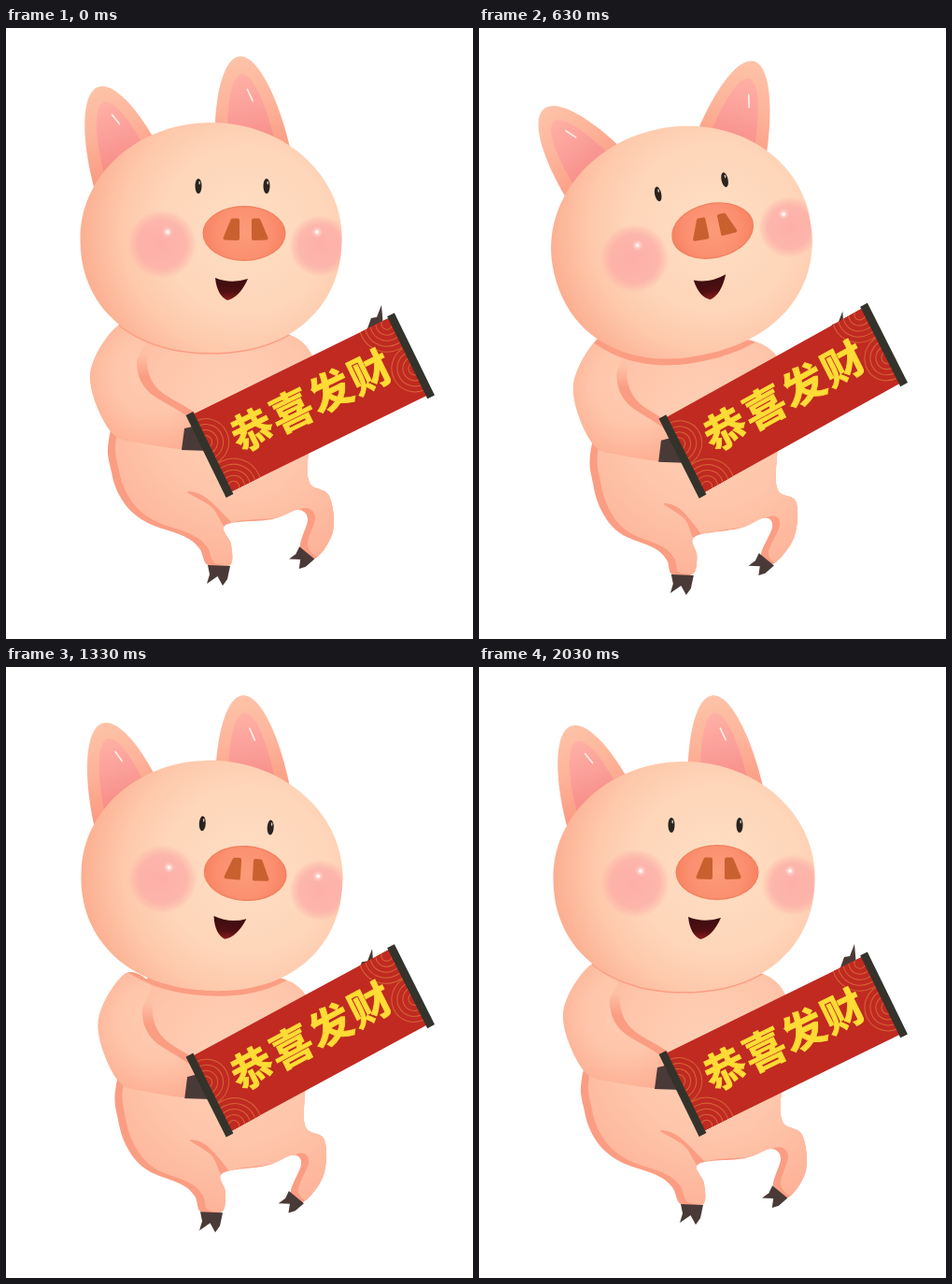
An HTML page with a canvas that plays this animation: 500 px wide and 653 px high, repeating every 2100 ms.

```html
<!DOCTYPE html>
<html lang="zh">
<head>
<meta charset="utf-8">
<title>恭喜发财</title>
<style>
html, body { margin: 0; width: 100%; height: 100%; overflow: hidden; background: #fff; }
canvas { display: block; width: 500px; height: 653px; }
</style>
</head>
<body>
<canvas id="stage" width="500" height="653"></canvas>
<script>
const ctx = document.getElementById('stage').getContext('2d');
const STEP = 70, COUNT = 30, LAST = COUNT - 1;
const LOW = 8, HIGH = 22, SUNK = 12; // turning points of head and body
const RAD = Math.PI / 180;
const SHADE = '#fb9d82', HOOF = '#4a3a37', RED = '#c02a21';

const TORSO = [
  [150, 320], [112, 430], [113, 475], [126, 507], [150, 528], [190, 543], [207, 556],
  [216, 574], [240, 574], [241, 552], [235, 531], [285, 525], [312, 515], [323, 525],
  [315, 555], [331, 567], [350, 538], [346, 500], [325, 486], [324, 450], [334, 372], [295, 325]
];
const ARM = [
  [120, 318], [90, 370], [111, 430], [146, 444], [206, 449],
  [200, 420], [152, 388], [140, 358], [150, 330]
];
const CREASE = [[194, 496], [220, 512], [234, 533], [246, 534], [214, 502]];
const HAND = [[191, 428], [212, 423], [218, 452], [188, 451]];
const LEAF = new Path2D('M-42 35C-40 -25 -22 -83 0 -83C22 -83 40 -25 42 35Z');
const CLEFT = new Path2D('M-12 0L12 1L9 15L4 22L-1.5 12L-13 20L-10 10Z');
const FAR_HAND = new Path2D('M387 321L391 310L397 309L402 296L404 320Z');
const NOSTRIL = new Path2D('M-14 -14L-8.5 -14L-8.5 5.5L-22 5Z');
const MOUTH = new Path2D('M224 267Q241 274 259 268Q250 288 237 291Q226 286 224 267Z');

// Rocks from rest to low, over to high and back to rest
function swing(n, low, high) {
  if (n < LOW) return low * n / LOW;
  if (n < HIGH) return low + (high - low) * (n - LOW) / (HIGH - LOW);
  return high * (LAST - n) / (LAST - HIGH);
}

const sink = n => n < SUNK ? n / SUNK : (LAST - n) / (LAST - SUNK);

// Sinking squeezes the body, tucks the legs in and brakes at the feet
const warp = (x, y, s) => [
  x + s * (0.09 * (250 - x) - 0.21 * Math.max(0, y - 500)),
  y + s * (17 - 0.07 * Math.max(0, x - 230)) - s * s * 0.25 * Math.max(0, y - 555)
];
const pose = (pts, s) => pts.map(([x, y]) => warp(x, y, s));

// Smooth closed curve through the points
function curve(pts) {
  const n = pts.length, at = i => pts[(i + n) % n], path = new Path2D();
  path.moveTo(...pts[0]);
  for (let i = 0; i < n; i++) {
    const [a, b, c, d] = [at(i - 1), at(i), at(i + 1), at(i + 2)];
    path.bezierCurveTo(b[0] + (c[0] - a[0]) / 6, b[1] + (c[1] - a[1]) / 6,
      c[0] - (d[0] - b[0]) / 6, c[1] - (d[1] - b[1]) / 6, c[0], c[1]);
  }
  return path;
}

function polygon(pts) {
  const path = new Path2D();
  pts.forEach(p => path.lineTo(...p));
  path.closePath();
  return path;
}

// An oval whose lower half is a little squarer
function headShape() {
  const pts = [];
  for (let a = 0; a < 360; a += 6) {
    const c = Math.cos(a * RAD), d = Math.sin(a * RAD), p = d > 0 ? 2 / 2.2 : 1;
    pts.push([219.5 + 140 * Math.sign(c) * Math.abs(c) ** p,
      224 + 123 * Math.sign(d) * Math.abs(d) ** p]);
  }
  return curve(pts);
}
const HEAD = headShape();

function stops(g, list) {
  list.forEach(([at, color]) => g.addColorStop(at, color));
  return g;
}
const radial = (x, y, r, list) => stops(ctx.createRadialGradient(x, y, 0, x, y, r), list);
const vertical = (y1, y2, list) => stops(ctx.createLinearGradient(0, y1, 0, y2), list);

function fill(path, style) {
  ctx.fillStyle = style;
  ctx.fill(path);
}

function oval(x, y, rx, ry, style) {
  const path = new Path2D();
  path.ellipse(x, y, rx, ry, 0, 0, 7);
  fill(path, style);
}

function line(x1, y1, x2, y2, width, color) {
  ctx.lineWidth = width;
  ctx.lineCap = 'round';
  ctx.strokeStyle = color;
  ctx.beginPath();
  ctx.moveTo(x1, y1);
  ctx.lineTo(x2, y2);
  ctx.stroke();
}

function group(draw) {
  ctx.save();
  draw();
  ctx.restore();
}

function place(x, y, deg, sx = 1, sy = sx) {
  ctx.translate(x, y);
  ctx.rotate(deg * RAD);
  ctx.scale(sx, sy);
}

function turnHead(deg) {
  place(239, 241, deg);
  ctx.translate(-239, -241);
}

function drawEar(x, y, deg, tall) {
  group(() => {
    place(x, y, deg, 1, tall);
    fill(LEAF, vertical(-83, 10, [[0, '#fdc3a8'], [0.5, '#fdb49a'], [1, '#fb9d84']]));
    ctx.clip(LEAF);
    group(() => {
      ctx.scale(0.64, 0.79);
      fill(LEAF, vertical(-83, 10, [[0, '#ffb0a5'], [0.5, '#fb9f99'], [1, '#f78b86']]));
    });
    line(4, -50, 8, -38, 1.6, '#fff0ee');
  });
}

function drawHoof(x, y, deg, size, s) {
  group(() => {
    place(...warp(x, y, s), deg, size);
    fill(CLEFT, HOOF);
  });
}

function drawBody(s, deg) {
  const torso = curve(pose(TORSO, s)), arm = curve(pose(ARM, s));
  const skin = radial(240, 410 + 14 * s, 185, [[0, '#ffd0b5'], [0.5, '#fec6ab'], [1, '#fdb095']]);
  fill(torso, SHADE);
  group(() => {
    ctx.clip(torso);
    group(() => {
      ctx.translate(8, -2);
      fill(torso, skin);
    });
    ctx.fillStyle = skin;
    ctx.fillRect(225, 300, 140, 190);
    fill(curve(pose(CREASE, s)), SHADE);
    group(() => {
      ctx.translate(11, -2);
      const top = 350 + 17 * s;
      fill(arm, vertical(top, top + 24, [[0, 'rgba(251,157,130,0)'], [1, SHADE]]));
    });
  });
  fill(arm, radial(158 + 9 * s, 370 + 15 * s, 88, [[0, '#ffcdb2'], [0.5, '#fec5aa'], [1, '#fdac8f']]));
  // Shadow under the chin
  group(() => {
    const both = new Path2D(torso);
    both.addPath(arm);
    ctx.clip(both);
    ctx.translate(0, 1.5 + 7 * s);
    turnHead(deg);
    fill(HEAD, SHADE);
  });
  drawHoof(228, 574, 0, 1, s);
  drawHoof(322.5, 560.5, 37, 0.87, s);
  fill(polygon(pose(HAND, s)), HOOF);
}

function blush(x, y, r) {
  oval(x, y, r, r, radial(x, y, r, [[0, 'rgba(252,160,162,.72)'], [0.7, 'rgba(252,164,163,.64)'],
    [0.88, 'rgba(252,172,164,.35)'], [1, 'rgba(253,185,165,0)']]));
}

function sparkle(x, y) {
  oval(x, y, 6, 6, radial(x, y, 6, [[0, 'rgba(255,255,255,.6)'], [1, 'rgba(255,255,255,0)']]));
  oval(x, y, 2, 2, '#fff3ee');
}

function drawNose() {
  oval(0, 0, 44.5, 29.5, '#f0805d');
  oval(0, 0, 43.3, 28.3, radial(0, -1, 44, [[0, '#fc9b78'], [0.65, '#fb9070'], [1, '#f78362']]));
  ctx.lineJoin = 'round';
  ctx.lineWidth = 4;
  ctx.strokeStyle = '#c9602f';
  for (const side of [1, -1]) {
    group(() => {
      place(1.5, 0, 0, side, 1);
      fill(NOSTRIL, '#c9602f');
      ctx.stroke(NOSTRIL);
    });
  }
}

function drawHead(deg) {
  group(() => {
    turnHead(deg);
    fill(HEAD, radial(256, 216, 178, [[0, '#ffdec2'], [0.5, '#fed6ba'], [0.75, '#fec8ab'], [1, '#fcae90']]));
    group(() => {
      ctx.clip(HEAD);
      blush(167, 231, 37);
      blush(336, 233, 33);
    });
    sparkle(173, 218);
    sparkle(333, 218);
    for (const x of [206, 279]) {
      oval(x, 169, 3.5, 8, '#29241f');
      line(x + 1.2, 164.5, x + 1.2, 166.5, 1.4, '#d8c9bb');
    }
    group(() => {
      ctx.translate(255, 219.5);
      drawNose();
    });
    fill(MOUTH, vertical(268, 291, [[0, '#3c0d10'], [0.6, '#4f0f12'], [1, '#8d1c1b']]));
  });
}

// Rings of waves on the cloth
function waves(x, y, size) {
  for (let r = size; r > 4; r -= 6) {
    ctx.beginPath();
    ctx.arc(x, y, r, 0, 7);
    ctx.fill();
    ctx.stroke();
  }
}

function drawBanner(s) {
  group(() => {
    // The right end rises while both bars keep their slant
    const k = -0.086 * s;
    ctx.transform(1, k, 0, 1, 0, -250 * k);
    place(218, 456, -26.1);
    group(() => {
      const cloth = new Path2D();
      cloth.rect(2, -46.5, 236, 92);
      fill(cloth, RED);
      ctx.clip(cloth);
      ctx.strokeStyle = 'rgba(226,140,66,.6)';
      ctx.lineWidth = 1;
      for (const side of [1, -1]) {
        group(() => {
          place(120, 0, 0, side);
          waves(-118, -14, 25);
          waves(-112, 42, 30);
        });
      }
    });
    ctx.fillStyle = '#34332b';
    for (const x of [0, 240]) ctx.fillRect(x - 4.3, -49, 8.6, 98);
    ctx.fillStyle = ctx.strokeStyle = '#ffdc35';
    ctx.lineWidth = 0.9;
    ctx.font = '900 45px "Noto Sans CJK SC", "Noto Sans CJK", sans-serif';
    ctx.textAlign = 'center';
    [...'恭喜发财'].forEach((c, i) => {
      ctx.fillText(c, 52.5 + 46.8 * i, 13);
      ctx.strokeText(c, 52.5 + 46.8 * i, 13);
    });
  });
}

function draw(now) {
  const n = Math.floor(now / STEP) % COUNT;
  const s = sink(n), deg = swing(n, -13.6, 8);
  const left = swing(n, -20, 9), right = swing(n, 25.5, -4.5);
  ctx.fillStyle = '#fff';
  ctx.fillRect(0, 0, 500, 653);
  drawEar(127 + 0.35 * left, 141 - 0.6 * left, left - 20, 1);
  drawEar(262 + 0.36 * right, 120 + 0.12 * right, right - 8, 1.09);
  group(() => {
    ctx.translate(-17 * s, 9 * s);
    fill(FAR_HAND, HOOF);
  });
  drawBody(s, deg);
  drawHead(deg);
  drawBanner(s);
}

const start = performance.now();
function tick() {
  draw(performance.now() - start);
  requestAnimationFrame(tick);
}
tick();
</script>
</body>
</html>
```
